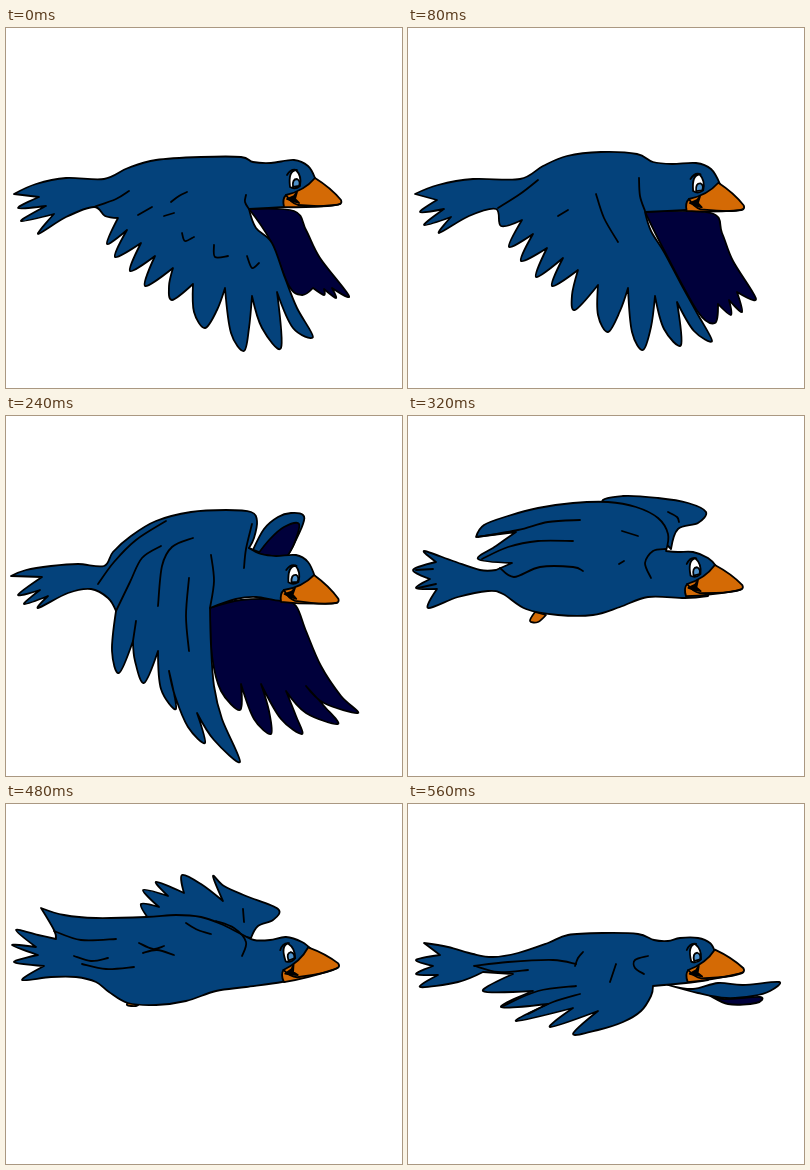
Write an HTML page that moves like this. It is 396 px wide and 360 px high and loops after 640 ms.

```html
<!DOCTYPE html>
<html lang="en">
<head>
<meta charset="utf-8">
<title>Flying bird</title>
<style>
html, body { margin: 0; width: 100%; height: 100%; overflow: hidden; background: #fff; }
svg { display: block; width: 396px; height: 360px; }
.pose {
  visibility: hidden;
  animation: show 640ms step-end infinite;
  animation-delay: calc(var(--i) * 80ms - 640ms);
}
@keyframes show {
  0% { visibility: visible; }
  12.5%, 100% { visibility: hidden; }
}
path { stroke: #000; stroke-width: 1.8; stroke-linejoin: round; stroke-linecap: round; }
</style>
</head>
<body>
<svg id="stage" viewBox="0 0 396 360">
  <defs>
    <g id="face">
      <path d="M309 150Q325 160 335 172Q337 177 329 177Q302 180 278 179Q276 171 280 167Q298 163 309 150Z" fill="#d46a05"/>
      <path d="M280 167Q285 175 292 177L308 178Q325 179 334 176" fill="none"/>
      <path d="M281 171L288 168L291 164L289 171L293 175L286 173Z"/>
      <path d="M284 159Q282 143 290 142Q296 148 294 158Q289 162 284 159Z" fill="#fff" stroke-width="1.5"/>
      <path d="M287 159Q286 151 291 151Q295 153 293 158Z" fill="#4c8fc8" stroke-width="1"/>
      <path d="M281 147Q285 140 291 142" fill="none"/>
    </g>
  </defs>
</svg>
<script>
const BLUE = '#04427b', NAVY = '#00003b', ORANGE = '#d46a05';

// Points are "x y"; a trailing "!" makes a sharp corner.
const parse = text => [...text.matchAll(/(\d+) (\d+)(!?)/g)]
  .map(([, x, y, corner]) => ({ x: +x, y: +y, corner: !!corner }));

const halfway = (a, b) => {
  const to = parse(b);
  return parse(a).map((p, i) =>
    `${Math.round((p.x + to[i].x) / 2)} ${Math.round((p.y + to[i].y) / 2)}${p.corner ? '!' : ''}`).join();
};

function curve(text, closed) {
  const points = parse(text), n = points.length;
  const at = i => closed ? points[(i + n) % n] : points[Math.max(0, Math.min(n - 1, i))];
  const handle = (i, side) => {
    const p = at(i), k = p.corner ? 0 : side / 6;
    return `${p.x + k * (at(i + 1).x - at(i - 1).x)} ${p.y + k * (at(i + 1).y - at(i - 1).y)}`;
  };
  let d = `M${points[0].x} ${points[0].y}`;
  for (let i = 0; i < (closed ? n : n - 1); i++) {
    d += `C${handle(i, 1)} ${handle(i + 1, -1)} ${at(i + 1).x} ${at(i + 1).y}`;
  }
  return closed ? d + 'Z' : d;
}

const glide = {
  far: '243 181!,288 183,300 202,314 230,343 268,326 260!,330 270,318 261!,318 267,307 260!,296 267,283 258,264 212',
  body: `8 166!,30 156,60 150,98 151,122 140,150 132,195 129,235 129,247 134,265 135,288 132,302 138,309 150!,
    300 178!,279 179,243 181!,250 200,266 215,279 250,291 280,307 309,287 300,271 264!,275 320,256 300,246 268!,
    243 300,238 323,225 305,219 260!,211 282,199 300,188 284,187 256!,166 272,163 258,167 240!,139 258,149 228!,
    124 243,135 215!,109 229,121 202!,101 216,112 190!,99 188,88 179,60 189,32 206,48 186!,15 193,40 178!,12 180,33 169!`
};
const press = {
  far: '231 186!,318 186,328 208,336 235,353 273,332 267!,338 298,324 282!,328 306,312 292!,318 323,296 310,250 235',
  body: `6 165!,30 157,70 152,125 150,148 136,168 124,190 119,222 123,243 134,262 137,288 137,304 144,314 161!,
    300 183!,278 184,231 186!,236 205,246 232,266 262,286 290,301 317,284 306,267 284!,270 314,256 302,247 268!,
    242 298,231 320,223 302,220 260!,213 283,201 307,192 290,193 258!,167 292,165 275,172 244!,148 258,160 231!,
    131 255,142 225!,116 237,128 210!,101 221,116 193!,87 207,88 182,62 186,30 203,38 191!,16 200,32 184!,12 188,24 174!`
};

const poses = [
  {
    shapes: [[NAVY, glide.far], [BLUE, glide.body]],
    lines: ['181 164,173 168,165 174', '168 185,158 188', '176 205,179 213,188 209', '208 217,209 229,222 228',
      '241 228,246 240,253 235', '146 179,132 187', '240 167,239 174,243 181', '88 179,110 171,123 163'],
    face: [0, 0, 0]
  },
  {
    shapes: [[NAVY, halfway(glide.far, press.far)], [BLUE, halfway(glide.body, press.body)]],
    lines: ['90 180,112 166,130 152', '188 166,196 190,210 214', '231 150,232 168,237 183', '160 182,150 188'],
    face: [1, 4, 1.5]
  },
  {
    shapes: [
      [NAVY, press.far],
      [BLUE, '238 128!,256 116,270 114,282 124,262 138!'],
      [NAVY, '262 138!,268 128,282 124,298 128,309 140,314 161!'],
      [BLUE, press.body]
    ],
    lines: ['140 140,120 163,92 181', '222 140,224 163,231 186', '198 166,203 195,218 222,238 240',
      '217 123,231 136,240 155,243 166'],
    face: [2, 8, 3]
  },
  {
    shapes: [
      [NAVY, `204 192!,235 184,275 184,290 190,300 215,315 250,335 280,352 297,318 287,300 270!,318 290,332 308,
        300 297,280 275!,290 300,296 318,275 303,255 268!,263 295,265 318,248 303,235 268!,234 294,215 275,206 240`],
      [BLUE, '246 136!,258 113,272 101,285 97,297 99,297 108,287 130,280 142!'],
      [NAVY, '252 138!,264 123,278 111,293 108,288 128,280 142!'],
      [BLUE, `5 160!,20 154,45 150,72 148,98 150,107 136,125 120,150 105,185 96,220 94,245 96,251 105,248 122,
        243 132!,255 138,270 140,290 139,302 146,309 161!,300 184!,275 185,250 181,230 183,204 192!,205 230,
        208 270,216 303,234 346,208 324,191 297!,199 327,182 311,169 280,163 255!,170 293,155 273,152 235!,
        138 267,129 245,127 225!,113 257,106 235,110 195!,102 182,85 173,62 177,32 192,42 180!,18 188,34 174!,12 179,36 161!`]
    ],
    lines: ['155 130,136 142,124 166,110 195', '187 122,166 131,156 150,152 190', '183 162,180 200,183 235',
      '205 139,208 165,204 192', '160 105,130 124,108 146,92 168', '246 108,240 133,238 152',
      '127 225,130 205', '243 132,253 136'],
    face: [-2, 7, 4]
  },
  {
    shapes: [
      [BLUE, '195 87,215 80,250 82,280 87,298 96,290 107,270 113,263 133!,240 110!'],
      [ORANGE, '127 196!,122 205,130 206,138 199!'],
      [BLUE, `68 121!,76 109,100 100,130 92,165 87,200 86,228 91,250 102,260 118,258 135!,270 136,285 136,300 142,
        308 150!,300 180!,277 182,240 181,212 191,185 199,150 199,118 193,95 178,80 175,50 181,20 192,29 173!,
        8 172,22 163!,5 154,28 146!,16 135,45 145,72 154,88 154!,104 147!,70 143,88 130,108 116!`]
    ],
    lines: ['70 121,110 114,140 106,172 104', '74 143,100 131,130 125,165 125', '92 152,106 161,132 151,165 151,175 155',
      '258 133,245 135,237 147,243 162', '214 115,230 120', '216 145,211 148', '260 96,269 101,271 106',
      '8 154,25 153', '10 172,28 168'],
    face: [-1, 1, -4]
  },
  {
    shapes: [
      [BLUE, `234 138!,236 105,232 78!,226 60,240 67!,238 37,253 50!,260 18,274 35,280 62,281 88,270 112,260 138!`],
      [ORANGE, '125 196!,121 203,130 205,136 199!'],
      [BLUE, `10 130!,32 139,60 148,90 154,120 151!,96 125,123 130!,98 96,126 106!,108 64,138 80!,128 34,157 54!,
        164 10,187 28,207 54,225 86,238 117,245 137!,262 137,283 135,298 140,306 148!,300 179!,277 180,240 182,
        210 189,180 199,145 200,113 192,92 179,60 176,18 184,30 169!,8 166,28 157!,5 147,29 146!`]
    ],
    lines: ['123 130,145 138,162 148', '126 106,153 120,177 137', '138 80,164 100,185 119', '157 54,181 80,199 103',
      '205 130,221 144,226 161', '253 50,257 78,252 104'],
    face: [-2, 0, -8]
  },
  {
    shapes: [
      [BLUE, `142 114!,135 100,153 103!,137 86,162 92!,150 78,178 89!,176 71,195 80,217 97!,207 72,218 82,240 92,
        272 105,267 116,252 122,245 134!,210 125!`],
      [ORANGE, '124 196!,121 201,130 202,134 199!'],
      [BLUE, `35 104!,58 111,90 114,140 113,170 111,195 113,215 120,235 130,248 136,264 136,280 133,296 138,
        306 146!,300 172!,276 178,240 183,210 187,180 197,150 201,122 199,103 188,90 178,70 173,45 173,16 176,
        38 162!,8 158,32 151!,6 141,30 143!,10 126,32 131,50 135!,48 126`]
    ],
    lines: ['48 127,75 136,110 135', '68 152,85 157,102 154', '76 160,100 165,128 163', '133 139,147 145,158 142',
      '137 149,151 146,168 151', '180 119,192 126,205 130', '237 105,238 118', '210 117,228 124,240 138,236 152'],
    face: [-3, -1, -12]
  },
  {
    shapes: [
      [NAVY, '298 189!,315 195,352 193,348 199,320 200'],
      [BLUE, '260 181!,285 185,310 179,335 181,371 178,362 187,345 192,318 194,290 189'],
      [BLUE, `16 139!,40 143,65 150,85 153,110 149,140 139,160 131,195 129,230 130,246 136,260 137,272 134,290 134,
        302 139,307 148!,300 176!,278 179,245 182!,243 192,233 207,215 218,190 226,165 230,190 207!,142 223,
        165 204!,108 217,140 200!,93 203,125 187!,75 187,105 170!,75 168!,50 178,12 183,30 171!,8 170,25 162!,
        8 156,32 151!`]
    ],
    lines: ['66 162,100 158,145 156,168 160', '95 202,130 187,168 182', '120 210,145 198,172 190',
      '175 148,170 154,167 162', '208 160,202 178', '240 152,227 156,227 164,236 170', '67 162,90 168,120 166'],
    face: [0, -1, -7]
  }
];

document.getElementById('stage').innerHTML += poses.map(({ shapes, lines, face: [dx, dy, turn] }, i) =>
  `<g class="pose" style="--i:${i}">` +
  shapes.map(([fill, points]) => `<path fill="${fill}" d="${curve(points, true)}"/>`).join('') +
  lines.map(points => `<path fill="none" d="${curve(points, false)}"/>`).join('') +
  `<use href="#face" transform="translate(${dx} ${dy}) rotate(${turn} 280 165)"/></g>`).join('');
</script>
</body>
</html>
```
